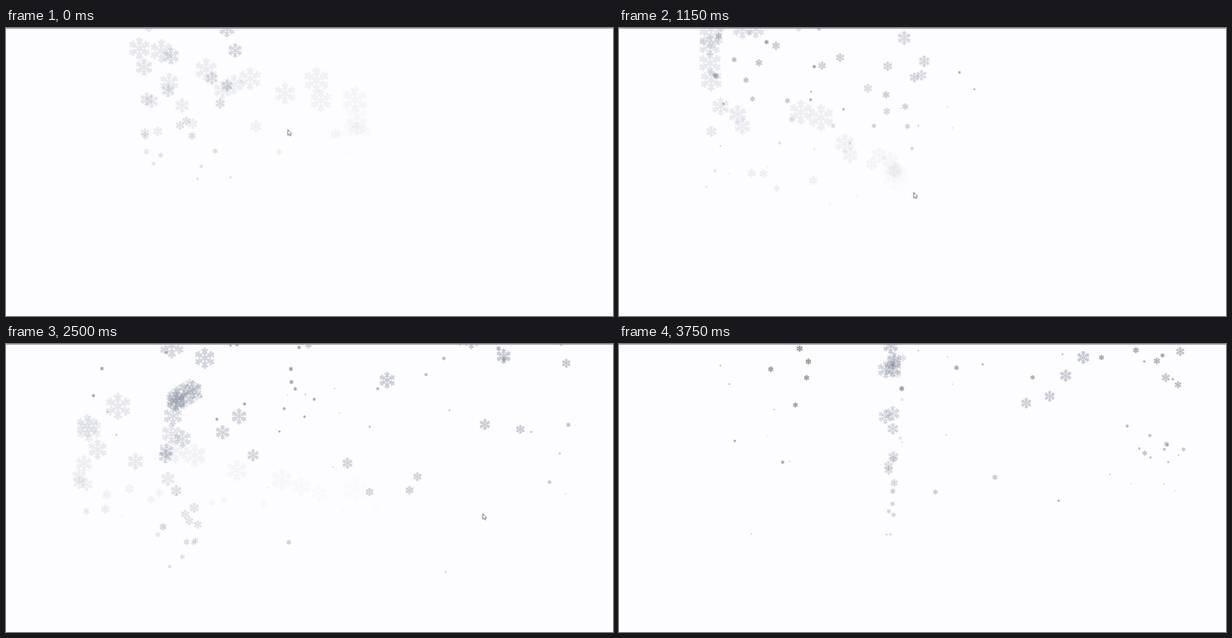
These frames come from a looping animation (800 by 381 pixels, 3800 ms). An HTML page with a canvas:

```html
<!DOCTYPE html>
<html lang="en">
<head>
<meta charset="utf-8">
<title>Snow trail</title>
<style>
  html, body { margin: 0; width: 100%; height: 100%; overflow: hidden; background: #fdfcff; }
  canvas { display: block; }
</style>
</head>
<body>
<canvas id="stage" width="800" height="381"></canvas>
<script>
const ctx = document.getElementById('stage').getContext('2d');
const LOOP = 3.8, STEP = 0.05;   // seconds
const RATE = 115;                // flakes per second
const RISE = 22.5;               // flake speed per pixel of size, in px/s
const FADE_IN = 0.52;            // opacity gained per second
const MAX_ALPHA = 0.75;
const LAG = 0.04;                // flakes trail the pointer by this many seconds

// Key points of the pointer's sweeps: seconds, x, y
const sweep = [
  [-.5, 300, 240], [-.28, 178, 215], [-.07, 470, 165], [.04, 371, 134],
  [.33, 122, 200], [.67, 405, 222], [.74, 250, 192], [.88, 115, 235],
  [.97, 240, 252], [1.05, 348, 222], [1.19, 388, 217], [1.42, 580, 150],
  [1.74, 738, 232], [1.87, 590, 348], [2.04, 212, 350], [2.17, 250, 325],
  [2.3, 95, 262], [2.4, 280, 228], [2.54, 628, 224], [2.95, 739, 242],
  [3.08, 600, 290], [3.15, 358, 295], [3.29, 356, 303], [3.52, 384, -40]
];

function slope(i, axis) {
  const [a, b] = [sweep[i], sweep[i + 1]];
  return a && b ? (b[axis] - a[axis]) / (b[0] - a[0]) : 0;
}

// Harmonic mean of both slopes, at rest where the direction turns
function tangent(i, axis) {
  const before = slope(i - 1, axis), after = slope(i, axis);
  return before * after > 0 ? 2 * before * after / (before + after) : 0;
}

function pointer(t) {
  let i = 0;
  while (i < sweep.length - 2 && sweep[i + 1][0] < t) i++;
  const a = sweep[i], b = sweep[i + 1], span = b[0] - a[0];
  const k = Math.min(1, Math.max(0, (t - a[0]) / span));
  const ease = k * k * (3 - 2 * k);
  return [1, 2].map(axis =>
    a[axis] + (b[axis] - a[axis]) * ease +
    span * k * (1 - k) * ((1 - k) * tangent(i, axis) - k * tangent(i + 1, axis)));
}

function seeded(seed) {
  return () => {
    seed = (seed * 1664525 + 1013904223) >>> 0;
    return seed / 4294967296;
  };
}

function makeFlakes() {
  const random = seeded(7);
  const spread = width => (random() - .5) * width;
  const flakes = [];
  for (let born = sweep[0][0]; born < LOOP; born += 1 / RATE) {
    const [x, y] = pointer(born);
    if (y < 0) break;
    flakes.push({ x: x + spread(14), y: y + spread(10), size: 1 + 36 * random(), born });
  }
  return flakes;
}

// Unit flake: six arms, each with two pairs of side twigs
function makeShape() {
  const shape = new Path2D();
  for (let arm = 0; arm < 6; arm++) {
    const angle = arm * Math.PI / 3 - Math.PI / 2;
    const at = (r, turn = 0, len = 0) => [
      r * Math.cos(angle) + len * Math.cos(angle + turn),
      r * Math.sin(angle) + len * Math.sin(angle + turn)
    ];
    shape.moveTo(0, 0);
    shape.lineTo(...at(.49));
    for (const [r, len] of [[.19, .13], [.31, .17]]) {
      shape.moveTo(...at(r, -1, len));
      shape.lineTo(...at(r));
      shape.lineTo(...at(r, 1, len));
    }
  }
  return shape;
}

const flakes = makeFlakes();
const shape = makeShape();
const arrow = new Path2D('M0 0V7.4L1.7 6L2.8 8.4L4 7.8L3 5.4H5Z');

function drawFlake({ x, y, size, born }, t) {
  const age = t - born;
  const top = y - RISE * size * age;
  if (age <= 0 || top < -size) return;
  ctx.save();
  ctx.translate(x, top);
  ctx.scale(size, size);
  ctx.globalAlpha = Math.min(MAX_ALPHA, FADE_IN * age);
  ctx.stroke(shape);
  ctx.restore();
}

function drawPointer(t) {
  const [x, y] = pointer(t + LAG);
  ctx.save();
  ctx.translate(Math.round(x) + .5, Math.round(y) + .5);
  ctx.fillStyle = '#fff';
  ctx.strokeStyle = '#666a70';
  ctx.lineWidth = .8;
  ctx.fill(arrow);
  ctx.stroke(arrow);
  ctx.restore();
}

function draw(t) {
  ctx.fillStyle = '#fdfcff';
  ctx.fillRect(0, 0, 800, 381);
  ctx.strokeStyle = '#5c677a';
  ctx.lineWidth = .09;
  for (const flake of flakes) drawFlake(flake, t);
  drawPointer(t);
  ctx.fillStyle = '#9ba1a6';
  ctx.fillRect(0, 0, 800, 1);
}

const start = performance.now();
function tick() {
  const t = Math.max(0, performance.now() - start) / 1000 % LOOP;
  draw(Math.floor(t / STEP) * STEP);
  requestAnimationFrame(tick);
}
tick();
</script>
</body>
</html>
```
